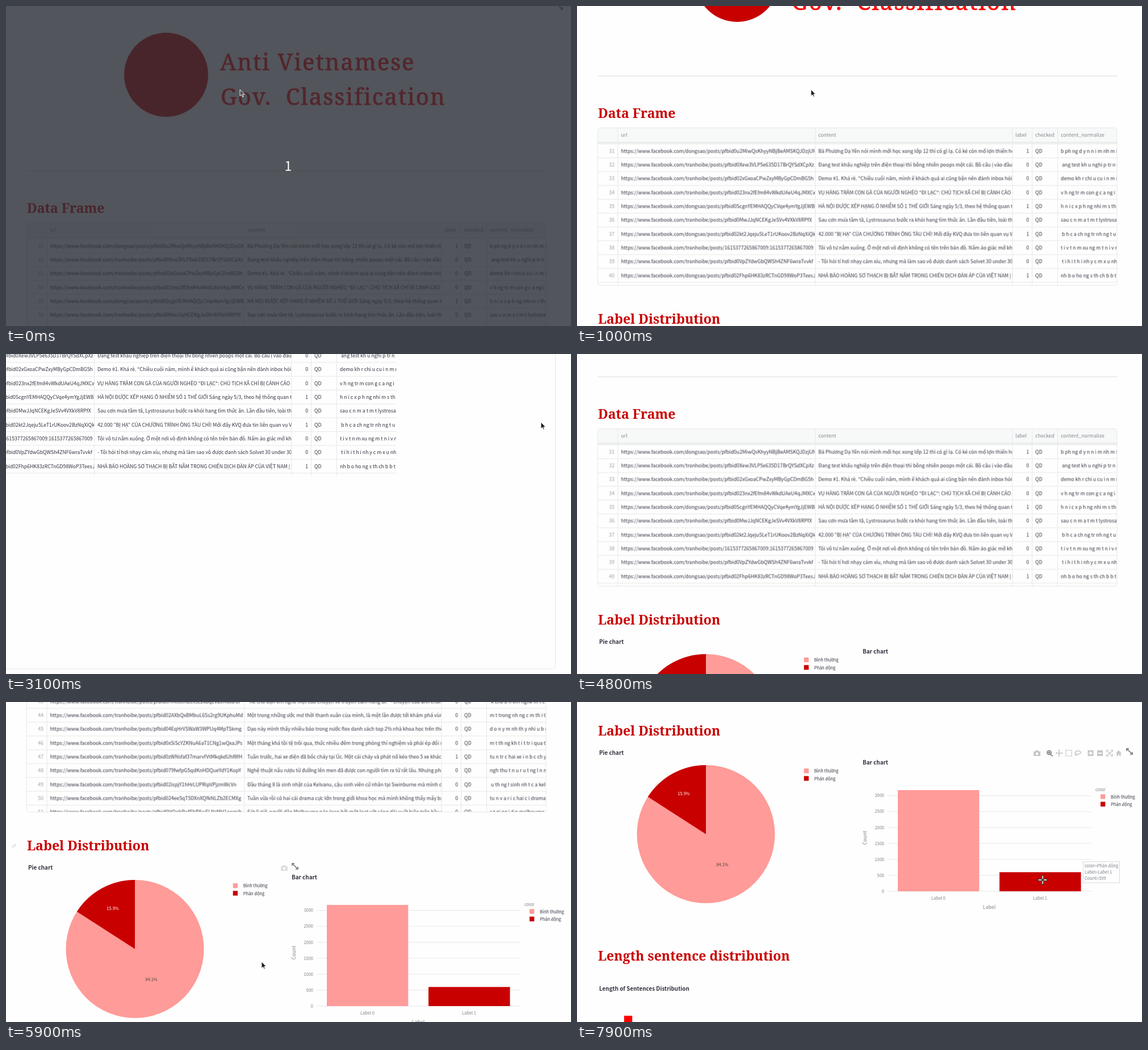
An HTML page that plays this animation: 995 by 563 pixels, repeating every 8 s.

```html
<!DOCTYPE html>
<html lang="vi">
<head>
<meta charset="utf-8">
<title>Data dashboard</title>
<style>
html, body { margin: 0; width: 100%; height: 100%; overflow: hidden; background: #fefefe; }
svg { display: block; }
#stage { width: 995px; height: 563px; }
text { white-space: pre; font: 8.7px "Noto Sans CJK JP", "Noto Sans CJK SC", "Noto Sans", sans-serif; fill: #31333f; }
.banner { font: 500 40px "Noto Serif", serif; letter-spacing: 2px; fill: #f00; stroke: #f00; stroke-width: .7; }
.h2 { font: 700 23.1px "Noto Serif", serif; fill: #c80000; }
.h3 { font-weight: 600; font-size: 9.9px; }
.head { fill: #83868d; }
.num { text-anchor: end; }
.idx { text-anchor: end; fill: #9a9b9f; }
.small { font-size: 7.45px; }
.tick { font-size: 7.45px; fill: #7d8089; }
.axis { font-size: 8.7px; fill: #7d8089; }
.mid { text-anchor: middle; }
.line { stroke: #e6e7e9; fill: none; }
.icon { fill: none; stroke: #c6c7ca; stroke-width: 1.7; }
.solid { fill: #c6c7ca; stroke: none; }
.dark { stroke: #77797f; }
.tip rect { fill: #fefefe; stroke: #cfd0d3; stroke-width: .8; }
.count { font-size: 23px; fill: #fff; text-anchor: middle; }
</style>
</head>
<body>
<svg id="stage" viewBox="0 0 995 563"></svg>
<script>
const PINK = '#ff9b98', RED = '#c80000', PAPER = '#fefefe';
const LOOP = 8000, ROW = 24.33;

// user ~ post ~ content ~ label ~ normalized content
const rows = `a~pfbid0u2MiwQsKhyyNBjBeAMSKQJDzjUNa~Bà Phương Dạ Yên nói mình mới học xong lớp 12 thì có gì lạ. Có kẻ còn mổ lợn thiến heo~1~b ph ng d y n n i m nh m i h c
b~pfbid0Xew3VLP5e635D17BrQYSdXCpXz~Đang test khẩu nghiệp trên điện thoại thì bỗng nhiên poops một cái. Bồ câu ị vào đầu~0~ ang test kh u nghi p tr n i n
b~pfbid02xGxoaCPwZxyMByGpCDmBG5h~Demo #1. Khá rè. "Chiều cuối năm, mình ế khách quá ai cũng bận nên đành inbox hỏi~0~demo kh r chi u cu i n m m
b~pfbid023nx2fEfm84vWkdUAeU4qJMXCwn1~VỤ HÀNG TRĂM CON GÀ CỦA NGƯỜI NGHÈO "ĐI LẠC": CHỦ TỊCH XÃ CHỈ BỊ CẢNH CÁO~0~v h ng tr m con g c a ng i
a~pfbid0ScgnYEMHAQQyCVqe4ymYgJjEWBD~HÀ NỘI ĐƯỢC XẾP HẠNG Ô NHIỄM SỐ 1 THẾ GIỚI Sáng ngày 5/3, theo hệ thống quan trắc~1~h n i c x p h ng nhi m s th gi
b~pfbid0MwJJqNCEKgJeSVv4VXkV8RPfX~Sau cơn mưa tầm tã, Lystrosaurus bước ra khỏi hang tìm thức ăn. Lần đầu tiên, loài thú~0~sau c n m a t m t lystrosaurus
a~pfbid02kt2Jqeju5LeT1rUKoov2BzNqXiQko~42.000 “BỊ HẠ” CỦA CHƯƠNG TRÌNH ÔNG TÀU CHÌ! Mới đây KVQ đưa tin liên quan vụ Vạn~1~ b h c a ch ng tr nh ng t u ch
b~1615377265867009:1615377265867009~Tôi vô tư nằm xuống. Ở một nơi vô định không có tên trên bản đồ. Nấm ảo giác mở khóa~0~t i v t n m xu ng m t n i v nh
b~pfbid0VpZYdwGbQWSh4ZNF6wraTvvkf~- Tôi hỏi tí hơi nhạy cảm xíu, nhưng mà làm sao vô được danh sách Solvet 30 under 30~0~ t i h i t h i nh y c m x u nh ng
a~pfbid02Fhp6HK83zRCTnGD98WoP3TeesJr~NHÀ BÁO HOÀNG SƠ THẠCH BỊ BẮT NẰM TRONG CHIẾN DỊCH ĐÀN ÁP CỦA VIỆT NAM | Mới~1~nh b o ho ng s th ch b b t n m
b~pfbid0kQ7hWmTzR4xYbVn2LsGd9CpJeAu~Buổi sáng ở phòng thí nghiệm bắt đầu bằng một ly cà phê nguội và mấy con số lạ lùng~0~bu i s ng ph ng th nghi m b t
b~pfbid02PrVtKe8XcMhZqN5yLwBsJ4gDfUo~Hôm qua trời đổ mưa đá, mình ngồi nhà đọc lại mấy trang nhật ký cũ từ hồi đi học xa~0~h m qua tr i m a m nh ng i nh
b~pfbid0HM8scnB3sSEzkdqEva5M6xDGf~"Kể cho bọn em nghe một câu chuyện về truyền cảm hứng đi." - Chuyện của anh chàng~0~ k cho b n em nghe m t c u
b~pfbid02AXbQxBMbuL6Ss2rg9UKphuMd~Một trong những ước mơ thời thanh xuân của mình, là một lần được tới khám phá vùng~0~m t trong nh ng c m th i thanh
b~pfbid04EqHrVSWaW3WPUq4MpTSkmg~Dạo này mình thấy nhiều báo trong nước flex danh sách top 2% nhà khoa học trên thế~0~d o n y m nh th y nhi u b o
b~pfbid0x5iScYZKNuA6aT1CNg1wQxaJPs~Một tháng khá tồi tệ trôi qua, thức nhiều đêm trong phòng thí nghiệm và phải ép đối mặt~0~m t th ng kh t i t tr i qua th c
b~pfbid0zWNsfaf37marvfVtMkqkdUhf8fH~Tuần trước, hai xe điện đã bốc cháy tại Úc. Một cái cháy và phát nổ kéo theo 5 xe khác~1~tu n tr c hai xe i n b c ch y t i
b~pfbid079fwfpG5qdKnHDQueYdY1KopY~Nghệ thuật nấu rượu từ đường lên men đã được con người tìm ra từ rất lâu. Nhưng phải~0~ngh thu t n u r u t ng l n men
b~pfbid02ispjY1hHrLUPRipVPjzmWcVn~Đầu tháng 8 là sinh nhật của Kelvanu, cậu sinh viên cử nhân tại Swinburne mà mình dạy~0~ u th ng l sinh nh t c a kelvanu
b~pfbid024ee5qT5DXnXQfkNLZb2ECMXg~Tuần vừa rồi có hai cái drama cực lớn trong giới khoa học mà mình không thấy mấy bạn~0~tu n v a r i c hai c i drama c c
b~pfbid0HQohRx4FhRXwELNrMH1oernih~Sát 0 giờ, người dân Melbourne náo loạn bởi một loạt vệt sáng dài xuất hiện trên bầu trời~0~s t gi ng i d n melbourne n o
b~pfbid0TgYw5NkRzVb8LxCq3MhPsJdE6a~Mùa đông năm ấy, cả nhóm quyết định lái xe lên núi chỉ để ngắm tuyết rơi một lần~0~m a ng n m y c nh m quy t nh`
  .split('\n').map(row => row.split('~'));
const users = { a: 'dongsao', b: 'tranhoibe' };

const text = (x, y, str, cls = '', extra = '') => `<text x="${x}" y="${y}" class="${cls}" ${extra}>${str}</text>`;
const rect = (x, y, w, h, fill, extra = '') => `<rect x="${x}" y="${y}" width="${w}" height="${h}" fill="${fill}" ${extra}/>`;
const line = (x1, y1, x2, y2) => `<path class="line" d="M${x1} ${y1}L${x2} ${y2}"/>`;
const clip = (x, y, w, h, body) => `<svg x="${x}" y="${y}" width="${w}" height="${h}">${body}</svg>`;
const group = (id, body, cls = '') => `<g id="${id}" class="${cls}">${body}</g>`;
const icon = (x, y, d, cls = '', extra = '') =>
  `<path class="icon ${cls}" transform="translate(${x} ${y})" d="${d}" fill-rule="evenodd" ${extra}/>`;
const frame = (x, y, w, h) => `<rect class="line" x="${x}" y="${y}" width="${w}" height="${h}" rx="5"/>`;

function table(x, y, w, h, live) {
  const edges = [35.5, 383, 730.5, 765, 810];
  const column = (left, width, cell) => clip(left, 0, width, 900,
    rows.map((r, i) => cell(r, 43.6 + i * ROW, i)).join(''));
  const cells = column(0, 35, (r, cy, i) => text(29.5, cy, 31 + i, 'idx'))
    + column(41, 342, (r, cy) => text(0, cy, `https://www.facebook.com/${users[r[0]]}/posts/${r[1]}`))
    + column(388.5, 342, (r, cy) => text(0, cy, r[2]))
    + column(731, 34, (r, cy) => text(28.5, cy, r[3], 'num'))
    + column(770.5, 39, (r, cy) => text(0, cy, 'QD'))
    + column(815.5, w - 815.5, (r, cy) => text(0, cy, r[4]))
    + rows.map((r, i) => line(0, 52.6 + i * ROW, w, 52.6 + i * ROW)).join('');
  const titles = [[41, 'url'], [388.5, 'content'], [735.5, 'label'], [770.5, 'checked'], [815.5, 'content_normalize']];
  return clip(x, y, w, h,
    (live ? group('rows', cells) : cells)
    + rect(0, 0, w, 25.5, '#f7f9f9')
    + (live ? group('headHover', rect(810, 0, w - 810, 25.5, '#e9f0f0')) : '')
    + rect(0, 25, w, 1, '#d9dbdd') + rect(0, 26, w, 3, '#eeeff0')
    + edges.map(e => line(e, 0, e, h)).join('')
    + titles.map(([tx, s]) => text(tx, 15.6, s, 'head')).join('')
    + (live ? group('bars', rect(909.5, 2, 4.5, 11, '#a5a6a8', 'rx="2"') + rect(.5, 272.5, 695, 4.5, '#a5a6a8', 'rx="2"')) : ''));
}

function tip(id, x, y, w, lines) {
  return group(id, rect(x, y, w, 4 + lines.length * 11, PAPER)
    + lines.map((s, i) => text(x + 2.5, y + 10.2 + i * 11, s, 'tick')).join(''), 'tip');
}

const legend = (x, y) => ['Bình thường', 'Phản động'].map((s, i) =>
  rect(x, y + i * 13.3, 8.3, 8.3, i ? RED : PINK) + text(x + 18, y + 7.2 + i * 13.3, s, 'small')).join('');

const EXPAND = 'M-5-1V-5H-1M-5-5L5 5M5 1V5H1';
const CAMERA = 'M-6-3H-3L-2-5H2L3-3H6V5H-6ZM2.3 1A2.3 2.3 0 1 0-2.3 1A2.3 2.3 0 1 0 2.3 1Z';

function pie() {
  const r = 121.5, a = 2 * Math.PI * .159;
  return `<g transform="translate(227 899.5)"><circle r="${r}" fill="${PINK}"/>
    <path fill="${RED}" d="M0 0V${-r}A${r} ${r} 0 0 0 ${-r * Math.sin(a)} ${-r * Math.cos(a)}Z"/></g>`
    + text(256, 956, '84.1%', 'small mid', 'style="fill:#444"')
    + text(188, 830.7, '15.9%', 'small mid', 'style="fill:#fff"')
    + legend(399.7, 784);
}

function bars() {
  let out = '';
  for (let k = 0; k <= 6; k++) {
    const y = 1000 - k * 28.05;
    out += line(547, y, 905.5, y) + text(541, y + 2.7, k * 500, 'tick num');
  }
  return out + rect(565, 822, 143.3, 178, PINK) + rect(744, 966.4, 143.5, 33.6, RED)
    + text(636.5, 1014.6, 'Label 0', 'tick mid') + text(815.5, 1014.6, 'Label 1', 'tick mid')
    + text(726, 1031.3, 'Label', 'axis mid')
    + text(0, 0, 'Count', 'axis mid', 'transform="translate(510 906) rotate(-90)"')
    + text(913, 823.6, 'color', 'tick') + legend(922, 829.3);
}

const modebar = icon(810, 757, CAMERA, 'solid')
  + icon(832, 757, 'M3-1A3.5 3.5 0 1 0-4-1A3.5 3.5 0 1 0 3-1M2 2L5.5 5.5M-2.5-1H1.5M-.5-3V1', 'dark')
  + icon(849, 757, 'M-5 0H5M0-5V5M-5-1.5V1.5M5-1.5V1.5M-1.5-5H1.5M-1.5 5H1.5')
  + icon(866, 757, 'M-5-5H5V5H-5Z', '', 'stroke-dasharray="2 1.3"')
  + icon(882, 757, 'M-3 2C-8-1-2-5 2-4C8-2 4 3-2 2C-5 2-4 5-2 4')
  + icon(904.5, 757, 'M-5-5H5V5H-5ZM-3-1V1H-1V3H1V1H3V-1H1V-3H-1V-1Z', 'solid')
  + icon(921, 757, 'M-5-5H5V5H-5ZM-3-1V1H3V-1Z', 'solid')
  + icon(938, 757, 'M-5-2V-5H-2M2-5H5V-2M5 2V5H2M-2 5H-5V2M-3-3L3 3M3-3L-3 3')
  + icon(954, 757, 'M-5 0L0-5L5 0H3.5V5H1V2H-1V5H-3.5V0Z', 'solid')
  + icon(973, 754, EXPAND, 'dark');

const page = `<circle cx="282" cy="121" r="74" fill="${RED}"/>`
  + text(377, 113, 'Anti Vietnamese', 'banner') + text(378, 174, 'Gov.  Classification', 'banner')
  + group('imageExpand', icon(975, 1, EXPAND, 'dark'))
  + rect(36.5, 289.5, 914.5, 1.2, '#e0e1e3')
  + text(37, 364, 'Data Frame', 'h2')
  + table(36.5, 381.5, 914.5, 277, true) + frame(36.5, 381.5, 914.5, 277)
  + text(37, 726, 'Label Distribution', 'h2')
  + group('anchor', icon(14, 718, 'M-1 1L1-1M0-2L1.5-3Q4-2 2.5 0L1 1.5M0 2L-1.5 3Q-4 2-2.5 0L-1-1.5', '', 'style="stroke-width:.9"'))
  + text(39, 760, 'Pie chart', 'h3') + pie()
  + group('pieTools', icon(490, 757, CAMERA, 'solid', 'opacity=".6"') + icon(509, 754, EXPAND, 'dark'))
  + text(503, 777.3, 'Bar chart', 'h3') + bars() + group('barTools', modebar)
  + tip('tipPiePink', 297, 958, 68, ['label=Bình thường', 'value=3168'])
  + tip('tipPieRed', 82, 806, 64, ['label=Phản động', 'value=599'])
  + tip('tipBarPink', 712, 804, 70, ['color=Bình thường', 'Label=Label 0', 'Count=3168'])
  + tip('tipBarRed', 891.5, 948, 64, ['color=Phản động', 'Label=Label 1', 'Count=599'])
  + text(37, 1122, 'Length sentence distribution', 'h2')
  + text(39, 1174.5, 'Length of Sentences Distribution', 'h3')
  + rect(83, 1219, 14.3, 40, '#f00');

const CROSS = 'M-7 0H-2M2 0H7M0-7V-2M0 2V7';
const cursor = `<path id="arrow" stroke="#fff" stroke-width=".9" d="M0 0V11.5L2.7 9L4.5 13L6.3 12.2L4.6 8.3H8.2Z"/>
  <path id="hand" fill="#1c1c1c" stroke="#fff" stroke-width=".6" d="M0 .8C0-.4 1.8-.4 1.8.8V4.5L6 5.3Q7.4 5.8 7.2 7.3L6.3 11.5H.3L-3 7.5Q-3.4 6.3-2.2 6.2L0 7.5Z"/>
  <g id="cross" fill="none"><path d="${CROSS}" stroke="#444" stroke-width="3.4" stroke-linecap="square"/><path d="${CROSS}" stroke="#fff" stroke-width="1.4"/></g>`;

const cover = rect(0, 0, 995, 563, PAPER);
document.getElementById('stage').innerHTML = cover + group('page', page)
  + group('shifted', cover + table(-227.5, -62, 914.5, 277) + frame(-20, -20, 987.5, 574))
  + group('full', cover + table(27, 9, 940.5, 545) + frame(27, 9, 940.5, 545))
  + group('dim', rect(0, 0, 995, 563, 'rgba(42,46,53,.81)') + text(497, 290, '1', 'count'))
  + group('cursor', cursor);

// Motion: every part holds its value until the next listed time.
let css = '';
const track = (id, steps) => {
  const keys = steps.map(([ms, rule]) => `${Math.max(0, ms - 1) / LOOP * 100}%{${rule}}`).join('');
  css += `@keyframes ${id}{${keys}}#${id}{animation:${id} ${LOOP}ms step-end infinite}`;
};
const ON = 'visibility:visible', OFF = 'visibility:hidden';
const show = (id, ...spans) => track(id, [[0, OFF], ...spans.flatMap(([a, b]) => [[a, ON], [b, OFF]])]);
const every = (start, values) => values.map((v, i) => [start + i * 100, v]);
const move = (id, steps) => track(id, steps.map(([ms, [x, y]]) => [ms, `transform:translate(${x}px,${y}px)`]));
const scroll = (id, steps) => move(id, steps.map(([ms, y]) => [ms, [0, -y]]));

scroll('page', [[0, 0], [400, 36],
  ...every(600, [60, 83.5, 110, 138, 167, 195, 220, 240, 250]),
  ...every(5700, [72, 143, 215, 275, 330, 370, 400, 412, 417].map(d => 250 + d))]);
scroll('rows', [[0, 0], ...every(4900, [15, 50, 90, 130, 170, 205, 235, 250])]);
move('cursor', [[0, [412, 147]],
  ...every(1600, [[640, 150], [965, 140], [935, 138], [938, 128], [942, 118]]),
  ...every(2300, [[940, 110], [937, 138], [940, 130], [942, 120]]),
  ...every(3500, [[935, 114], [922, 106], [912, 101], [906, 100]]),
  ...every(4900, [[860, 180], [700, 260], [620, 295], [600, 300]]),
  [5600, [450, 457]], [6400, [450, 390]],
  ...every(6500, [[450, 310], [400, 290], [330, 280], [270, 270], [230, 245], [200, 190], [195, 170], [200, 185],
    [340, 250], [465, 300], [560, 305], [640, 300], [700, 295], [790, 312], [820, 313]])]);
track('arrow', [[0, ON + ';fill:#4b474d'], [100, 'fill:#1c1c1c'], [1800, OFF], [1900, ON], [2400, OFF], [2500, ON],
  [4800, OFF], [4900, ON], [7600, OFF]]);
show('hand', [1800, 1900], [2400, 2500]);
show('cross', [7600, LOOP]);
show('dim', [0, 100]);
show('imageExpand', [0, 400]);
show('headHover', [1800, 1900], [2400, 2500]);
show('bars', [1600, 1700], [1800, 1900], [2400, 2500], [4900, 5600]);
show('shifted', [3100, 3200]);
show('full', [3200, 4800]);
show('anchor', [5700, 6400]);
show('pieTools', [5700, 7500]);
show('barTools', [7600, LOOP]);
show('tipPiePink', [6700, 7000], [7300, 7400]);
show('tipPieRed', [7000, 7300]);
show('tipBarPink', [7600, 7800]);
show('tipBarRed', [7800, LOOP]);
document.head.appendChild(document.createElement('style')).textContent = css;
</script>
</body>
</html>
```
